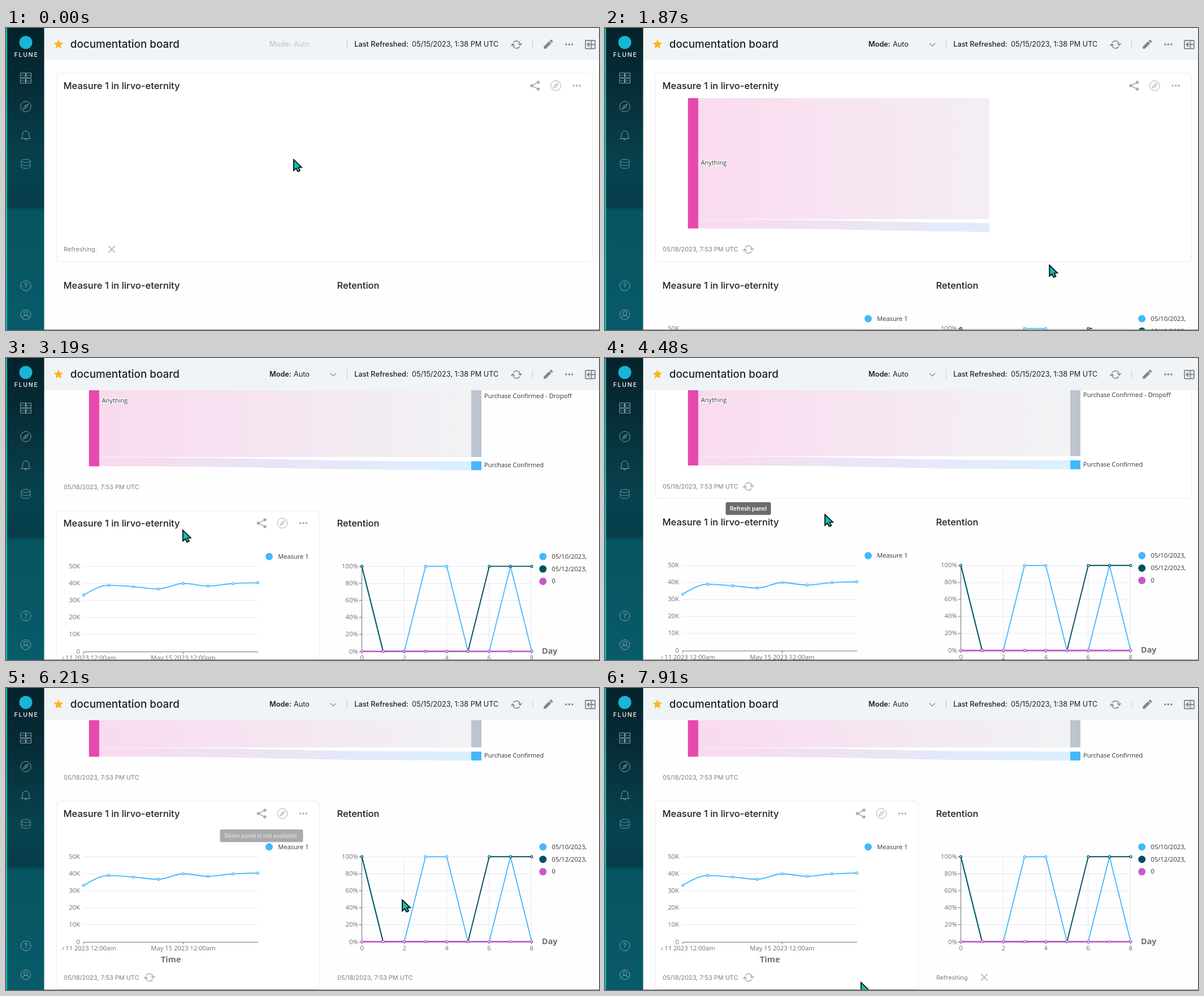
These frames come from a looping animation (1049 by 534 pixels, 8000 ms). An HTML page with a canvas:

```html
<!DOCTYPE html>
<html lang="en">
<head>
<meta charset="utf-8">
<title>Board</title>
<style>
html, body { margin: 0; width: 100%; height: 100%; overflow: hidden; background: #fff; }
canvas { display: block; width: 1049px; height: 534px; }
</style>
</head>
<body>
<canvas id="stage" width="1049" height="534"></canvas>
<script>
const W = 1049, H = 534, LOOP = 8000, LOADED = 1030, REVEAL = 1110, CLICK = 7550;
const ctx = document.getElementById('stage').getContext('2d');
const INK = '#1a2129', MUTED = '#76818f', ICON = '#a5aeb9', BLUE = '#45b7fd', DARK = '#00525f',
  PINK = '#e649ae', PURPLE = '#c957cb', GRID = '#e4e8f1', AXIS = '#6e7079';
const inter = (size, weight = 400) => `${weight} ${size}px Inter, sans-serif`;
const sans = (size, weight = 400) => `${weight} ${size}px "Open Sans", sans-serif`;

// Timeline
const clamp = v => Math.max(0, Math.min(1, v));
const ramp = (t, from, to) => clamp((t - from) / (to - from));
const ease = p => p * p * (3 - 2 * p);
const during = (t, ...spans) => spans.some(([a, b]) => t >= a && t < b);
const fade = (t, a, b, c, d) => ramp(t, a, b) * (1 - ramp(t, c, d));

const pointerPath = [
  [200, 508, 231], [430, 412, 315], [600, 482, 376], [780, 580, 425], [930, 643, 433],
  [1030, 643, 433], [1180, 735, 430], [1340, 808, 364], [1500, 813, 362], [1830, 798, 415],
  [2100, 715, 434], [2350, 460, 434], [2560, 389, 414], [2680, 389, 367], [2780, 386, 352],
  [3120, 302, 316], [3480, 352, 249], [3580, 352, 249], [3710, 253, 223], [4230, 253, 223],
  [4480, 388, 275], [4780, 456, 287], [5870, 456, 287], [6210, 700, 373], [6280, 712, 388],
  [6350, 712, 388], [6700, 736, 498], [7070, 737, 507], [7170, 737, 507], [7600, 735, 506],
  [7910, 452, 519], [8000, 452, 519]
];

function pointerAt(t) {
  const i = pointerPath.findIndex(k => k[0] > t);
  if (i < 1) return pointerPath[0].slice(1);
  const a = pointerPath[i - 1], b = pointerPath[i], p = ramp(t, a[0], b[0]);
  return [a[1] + (b[1] - a[1]) * p, a[2] + (b[2] - a[2]) * p];
}

const scrollAt = t => 164.5 * ease(ramp(t, 2720, 3220)) + 68.5 * ease(ramp(t, 5560, 5960));

// Drawing helpers
function text(str, x, y, font, color, align = 'left') {
  ctx.font = font;
  ctx.fillStyle = color;
  ctx.textAlign = align;
  ctx.fillText(str, x, y);
}

function stroke(points, color, width = 1, close = false) {
  ctx.beginPath();
  points.forEach(([x, y]) => ctx.lineTo(x, y));
  if (close) ctx.closePath();
  ctx.strokeStyle = color;
  ctx.lineWidth = width;
  ctx.stroke();
}

function circle(x, y, r, fill, line, width = 1) {
  ctx.beginPath();
  ctx.arc(x, y, r, 0, 7);
  if (fill) { ctx.fillStyle = fill; ctx.fill(); }
  if (line) { ctx.strokeStyle = line; ctx.lineWidth = width; ctx.stroke(); }
}

function box(x, y, w, h, r, fill, line, width = 1) {
  ctx.beginPath();
  ctx.roundRect(x, y, w, h, r);
  if (fill) { ctx.fillStyle = fill; ctx.fill(); }
  if (line) { ctx.strokeStyle = line; ctx.lineWidth = width; ctx.stroke(); }
}

function rect(x, y, w, h, fill) {
  ctx.fillStyle = fill;
  ctx.fillRect(x, y, w, h);
}

function at(x, y, draw) {
  ctx.save();
  ctx.translate(x, y);
  draw();
  ctx.restore();
}

function clipped(x, y, w, h, draw) {
  ctx.save();
  ctx.beginPath();
  ctx.rect(x, y, w, h);
  ctx.clip();
  draw();
  ctx.restore();
}

// Icons
function refreshIcon(x, y, color) {
  at(x, y, () => {
    ctx.scale(-1, 1);
    for (let i = 0; i < 2; i++) {
      ctx.beginPath();
      ctx.arc(0, 0, 6.6, Math.PI, -0.55);
      ctx.strokeStyle = color;
      ctx.lineWidth = 1.5;
      ctx.stroke();
      stroke([[-9.6, -2.2], [-6.6, 1.2], [-3.3, -2]], color, 1.5);
      ctx.rotate(Math.PI);
    }
  });
}

function compassIcon(x, y, color, r = 8.8) {
  circle(x, y, r, null, color, 1);
  stroke([[x + 4.5, y - 4.5], [x + 1.7, y + 1.7], [x - 4.5, y + 4.5], [x - 1.7, y - 1.7]], color, 1, true);
  circle(x, y, 1, null, color, 0.8);
}

function shareIcon(x, y, color) {
  stroke([[x + 6, y - 6], [x - 5.5, y], [x + 6, y + 6]], color, 1.6);
  [[6, -6], [-5.5, 0], [6, 6]].forEach(([dx, dy]) => circle(x + dx, y + dy, 2.8, color));
}

function dotsIcon(x, y, color) {
  [-5.5, 0, 5.5].forEach(dx => circle(x + dx, y, 1.8, color));
}

function crossIcon(x, y) {
  stroke([[x - 6, y - 6], [x + 6, y + 6]], ICON, 1.6);
  stroke([[x - 6, y + 6], [x + 6, y - 6]], ICON, 1.6);
}

function tooltip(label, x, y, w, alpha) {
  if (!alpha) return;
  ctx.globalAlpha = alpha;
  box(x, y, w, 22.5, 3, '#696b6c');
  text(label, x + w / 2, y + 14.8, inter(9.75, 600), '#fff', 'center');
  ctx.globalAlpha = 1;
}

// Panels
function panel(x, y, w, h, title, hovered, shareActive) {
  if (hovered) box(x + .5, y + .5, w, h, 6, '#fff', '#e8eaed');
  text(title, x + 13, y + 28, inter(16.55, 500), INK);
  if (!hovered) return;
  const right = x + w, cy = y + 22.5;
  if (shareActive) box(right - 117.5, cy - 16, 31.5, 31, 5, '#e7ebf0', '#c3cbd5');
  shareIcon(right - 101.5, cy, ICON);
  compassIcon(right - 64.5, cy, ICON);
  dotsIcon(right - 27.5, cy, ICON);
}

function status(x, y, hovered, refreshingFor) {
  if (refreshingFor >= 0) {
    const dots = '.'.repeat(Math.floor(refreshingFor / 400) % 4);
    text('Refreshing' + dots, x, y + 4, inter(10.9), MUTED);
    crossIcon(x + 85, y);
  } else {
    text('05/18/2023, 7:53 PM UTC', x, y + 4, inter(10.95), MUTED);
    if (hovered) refreshIcon(x + 151.7, y + .3, ICON);
  }
}

function flow(y1, y2, h1, h2, color) {
  const x1 = 165, x2 = 823, mid = (x1 + x2) / 2;
  const g = ctx.createLinearGradient(x1, 0, x2, 0);
  g.addColorStop(0, PINK);
  g.addColorStop(1, color);
  ctx.beginPath();
  ctx.moveTo(x1, y1);
  ctx.bezierCurveTo(mid, y1, mid, y2, x2, y2);
  ctx.lineTo(x2, y2 + h2);
  ctx.bezierCurveTo(mid, y2 + h2, mid, y1 + h1, x1, y1 + h1);
  ctx.globalAlpha = .2;
  ctx.fillStyle = g;
  ctx.fill();
  ctx.globalAlpha = 1;
}

function sankey(p) {
  const font = sans(11.1), gray = '#bdc4cf';
  clipped(137, 100, p < 1 ? 714 * p : 900, 290, () => {
    flow(124, 124, 214.2, 214, gray);
    flow(338.8, 345.5, 15.7, 15.7, BLUE);
    rect(146.7, 124, 18.2, 230.5, PINK);
    rect(823, 124, 18, 214, gray);
    rect(823, 345.5, 18, 15.7, BLUE);
    ctx.font = font;
    ctx.textAlign = 'left';
    ctx.strokeStyle = '#fff';
    ctx.lineWidth = 2.5;
    ctx.strokeText('Anything', 169.5, 242);
    text('Anything', 169.5, 242, font, '#333');
    if (p < 1) return;
    text('Purchase Confirmed - Dropoff', 846, 233.5, font, '#333');
    text('Purchase Confirmed', 846, 356, font, '#333');
  });
}

function legend(x, y, color, label) {
  circle(x, y, 6.5, color);
  text(label, x + 15.8, y + 3.5, sans(11.1), '#333');
}

const markers = (points, color) => points.forEach(([x, y]) => circle(x, y, 1.9, '#fff', color, 1.4));

function smoothLine(points, color) {
  const slope = i => (points[i + 1][1] - points[i][1]) / (points[i + 1][0] - points[i][0]);
  const last = points.length - 1;
  const tangent = points.map((_, i) => {
    if (i === 0) return slope(0) * 1.5;
    if (i === last) return 0;
    const a = slope(i - 1), b = slope(i);
    return a * b <= 0 ? 0 : (a + b) / 2;
  });
  ctx.beginPath();
  ctx.moveTo(...points[0]);
  for (let i = 0; i < last; i++) {
    const [x1, y1] = points[i], [x2, y2] = points[i + 1], d = (x2 - x1) / 3;
    ctx.bezierCurveTo(x1 + d, y1 + tangent[i] * d, x2 - d, y2 - tangent[i + 1] * d, x2, y2);
  }
  ctx.strokeStyle = color;
  ctx.lineWidth = 1.8;
  ctx.stroke();
}

const CHART_TOP = 531, CHART_BOTTOM = 681.5, ROW = 30.1;
const label = sans(11.3);

function measureChart(p) {
  for (let i = 0; i < 6; i++) {
    const y = Math.round(CHART_BOTTOM - i * ROW) + .5;
    stroke([[137, y], [446, y]], i ? GRID : AXIS);
    text(i ? i + '0K' : '0', 131, y + 3, label, AXIS, 'right');
  }
  clipped(100, 680, 450, 60, () => {
    [[137.5, 'May 11'], [313.5, 'May 15']].forEach(([x, day]) => {
      stroke([[x, 682], [x, 686]], AXIS);
      text(day + ' 2023 12:00am', x, 697, sans(11.2), AXIS, 'center');
    });
  });
  text('Time', 291.7, 718, sans(14.4, 700), AXIS, 'center');
  const points = [582, 564.7, 567.2, 571.2, 561.5, 566, 561.7, 560.2].map((y, i) => [137.5 + 44 * i, y]);
  clipped(130, 520, 8 + 314 * p, 170, () => {
    smoothLine(points, BLUE);
    markers(points, BLUE);
  });
  legend(465.5, 514, BLUE, 'Measure 1');
}

function retentionChart(p) {
  const x0 = 629.5, step = 37.56;
  for (let i = 0; i < 6; i++) {
    const y = Math.round(CHART_BOTTOM - i * ROW) + .5;
    stroke([[x0, y], [930, y]], i ? GRID : AXIS);
    stroke([[x0 - 5, y], [x0, y]], AXIS);
    text(i * 20 + '%', 622.8, y + 3, label, AXIS, 'right');
  }
  for (let i = 0; i < 5; i++) {
    const x = Math.round(x0 + i * 2 * step) - .5;
    stroke([[x, CHART_TOP], [x, CHART_BOTTOM]], i ? GRID : AXIS);
    stroke([[x, 682], [x, 686]], AXIS);
    text(i * 2, x + .3, 697, label, AXIS, 'center');
  }
  text('Day', 948, 685.5, sans(14.4, 700), AXIS);
  clipped(620, 520, 13 + 301 * p, 170, () => {
    [['100110010', BLUE, 1.8], ['100000111', DARK, 1.9], ['000000000', PURPLE, 2.4]].forEach(([bits, color, width]) => {
      const points = [...bits].map((b, i) => [x0 + i * step, +b ? CHART_TOP + .3 : CHART_BOTTOM]);
      stroke(points, color, width);
      markers(points, color);
    });
  });
  clipped(940, 500, 88, 80, () => {
    legend(949.8, 514, BLUE, '05/10/2023,');
    legend(949.8, 536, DARK, '05/12/2023,');
    legend(949.8, 557.8, PURPLE, '0');
  });
}

function content(t) {
  const name = 'Measure 1 in lirvo-eternity';
  const overTop = during(t, [0, 1950], [2760, 2960], [3600, 4540]);
  const overLine = during(t, [3000, 3400], [4580, 6250], [7800, LOOP]);
  const overRetention = during(t, [6400, 7720]);
  const loaded = t >= LOADED, p = ramp(t, REVEAL, REVEAL + 1000);

  panel(88.5, 79.5, 948.5, 333, name, overTop);
  panel(88.5, 432.5, 465, 332.5, name, overLine, during(t, [4760, 5760]));
  panel(572.5, 432.5, 465, 332.5, 'Retention', overRetention);
  status(102, 391.3, overTop, loaded ? -1 : t + 400);
  status(102, 744.5, overLine, -1);
  status(586, 744.5, overRetention, t - CLICK);
  if (loaded) {
    sankey(p);
    measureChart(p);
    retentionChart(p);
  }
  tooltip('Refresh panel', 213.5, 419.5, 80, fade(t, 3930, 4030, 4500, 4620));
  tooltip('Share panel is not available.', 378.5, 483, 147, fade(t, 4930, 5070, 6150, 6290));
  tooltip('Refresh panel', 698, 695, 80, fade(t, 7170, 7260, 7620, 7740));
}

function header(t) {
  const on = t >= LOADED, gray = '#7b8793';
  rect(67, 0, W - 67, 57, '#f0f4f7');
  ctx.beginPath();
  for (let i = 0; i < 10; i++) {
    const r = i % 2 ? 4.3 : 8.6, a = i * Math.PI / 5 - Math.PI / 2;
    ctx.lineTo(92.8 + r * Math.cos(a), 29 + r * Math.sin(a));
  }
  ctx.closePath();
  ctx.fillStyle = '#ffb420';
  ctx.fill();
  text('documentation board', 113.8, 35, inter(18.85, 500), INK);
  text('Mode:', 466, 32.5, inter(12.7, 600), on ? INK : '#c6cace');
  text('Auto', 509, 32.5, inter(12.7), on ? INK : '#c3c8cd');
  if (on) stroke([[574, 27], [579, 32], [584, 27]], gray, 1.1);
  stroke([[603.5, 20], [603.5, 36]], '#c2c8ce');
  text('Last Refreshed:', 616.3, 32.5, inter(12.75, 500), INK);
  text('05/15/2023, 1:38 PM UTC', 718, 32.5, inter(12.7), INK);
  refreshIcon(903, 29.3, gray);
  stroke([[931.5, 22], [931.5, 35]], '#c2c8ce');
  at(959, 29, () => {
    ctx.rotate(-Math.PI / 4);
    ctx.fillStyle = gray;
    ctx.beginPath();
    [[-11, 0], [-8, -2.7], [5, -2.7], [5, 2.7], [-8, 2.7]].forEach(q => ctx.lineTo(...q));
    ctx.fill();
    box(6.3, -2.7, 3.5, 5.4, 1, gray);
  });
  dotsIcon(996.3, 29, gray);
  box(1025, 22, 17, 14.5, 1, null, gray, 1.8);
  stroke([[1035.5, 22], [1035.5, 36.5]], gray, 1.8);
  stroke([[1041, 29.2], [1029, 29.2]], gray, 2);
  stroke([[1032, 25.5], [1028.3, 29.2], [1032, 33]], gray, 2);
}

function sidebar() {
  const line = '#88a2aa';
  const g = ctx.createLinearGradient(0, 0, 0, H);
  [[0, '#05222b'], [.18, '#062c36'], [.35, '#073a45'], [.46, '#06434f'], [.59, '#053d49'],
    [.605, '#075462'], [1, '#085b69']].forEach(s => g.addColorStop(...s));
  rect(0, 0, 67.5, H, g);
  rect(0, 0, 2, H, '#08c3b5');
  circle(35, 25.5, 11.5, '#19b5d6');
  ctx.letterSpacing = '1.8px';
  text('FLUNE', 36, 51, inter(10.5, 500), '#fff', 'center');
  ctx.letterSpacing = '0px';
  for (let i = 0; i < 4; i++) {
    const x = 25.5 + 10 * (i % 2), y = i < 2 ? 79.5 : 89.5;
    ctx.strokeStyle = line;
    ctx.lineWidth = 1;
    ctx.strokeRect(x, y, 9, 8);
    stroke([[x, y + 4], [x + 9, y + 4]], line, .7);
  }
  compassIcon(35, 139, line, 9.2);
  at(35, 190, () => {
    ctx.beginPath();
    ctx.moveTo(-8, 5.5);
    ctx.bezierCurveTo(-5, 2, -6, 0, -5.6, -3);
    ctx.bezierCurveTo(-5, -9.5, 5, -9.5, 5.6, -3);
    ctx.bezierCurveTo(6, 0, 5, 2, 8, 5.5);
    ctx.closePath();
    ctx.moveTo(-2.2, 6);
    ctx.quadraticCurveTo(0, 10.5, 2.2, 6);
    ctx.lineWidth = 1;
    ctx.stroke();
  });
  ctx.beginPath();
  ctx.ellipse(35, 235, 8, 2.8, 0, 0, 7);
  [240.5, 245.5].forEach(y => {
    ctx.moveTo(43, y);
    ctx.ellipse(35, y, 8, 2.8, 0, 0, Math.PI);
  });
  ctx.moveTo(27, 235);
  ctx.lineTo(27, 245.5);
  ctx.moveTo(43, 235);
  ctx.lineTo(43, 245.5);
  ctx.stroke();
  circle(35, 456, 8.8, null, line);
  text('?', 35, 460.3, inter(12), line, 'center');
  circle(35, 507, 8.8, null, line);
  circle(35, 504.8, 3.4, null, line);
  ctx.beginPath();
  ctx.arc(35, 514, 6, Math.PI * 1.07, -Math.PI * .07);
  ctx.stroke();
}

function pointer(t) {
  const [x, y] = pointerAt(t);
  at(x, y, () => {
    if (during(t, [4760, 5760])) {
      circle(0, 0, 8, '#e9f1f2');
      [['#0a0a0a', 5], ['#10c3b1', 2.2]].forEach(([color, width]) => {
        circle(0, 0, 8, null, color, width);
        stroke([[-5.5, -5.5], [5.5, 5.5]], color, width);
      });
      return;
    }
    ctx.lineJoin = 'miter';
    ctx.fillStyle = '#06c4b2';
    stroke([[1, 1.8], [1, 20.8], [5.3, 17], [8.3, 22.7], [12, 21], [9.2, 15.5], [14.8, 15.2]], '#0a0a0a', 1.6, true);
    ctx.fill();
    ctx.stroke();
  });
}

function render(t) {
  ctx.lineJoin = 'round';
  rect(0, 0, W, H, '#fefefe');
  at(0, -scrollAt(t), () => content(t));
  header(t);
  sidebar();
  pointer(t);
  rect(67, 533, W - 67, 1, '#858789');
}

function frame() {
  render(performance.now() % LOOP);
  requestAnimationFrame(frame);
}
frame();
</script>
</body>
</html>
```
